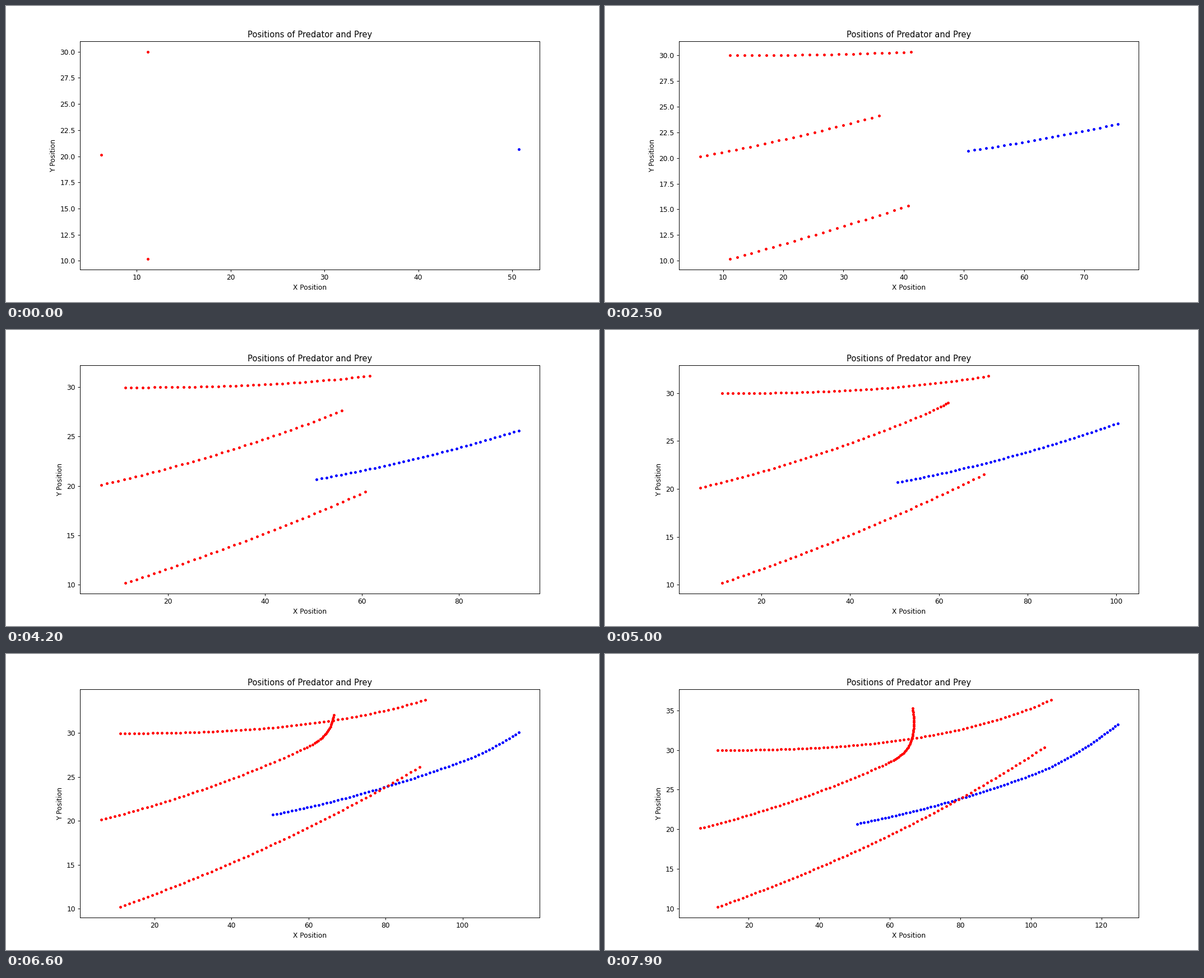
A matplotlib script for the animation above (8 s loop, 1058 px wide and 529 px high).

```python
import numpy as np
import matplotlib.pyplot as plt
from matplotlib.animation import FuncAnimation

STEPS = 80
INTERVAL = 100
t = np.arange(STEPS - 1) + 0.5  # middle of each step


def walk(x, y, vx, vy):
    """Positions after every step, starting from (x, y)."""
    return x + np.append(0, np.cumsum(vx)), y + np.append(0, np.cumsum(vy))


def steer(x, y, speed, heading):
    return walk(x, y, speed * np.cos(heading), speed * np.sin(heading))


# The prey tires late in the chase: it slows down and turns away harder.
fatigue = 1 - np.exp(-np.maximum(t - 50, 0) / 20)
prey = steer(50.72, 20.68, 1 - 0.28 * fatigue,
             0.0862 + 0.0015 * t + 0.165 * fatigue)

# The outer predators keep their speed and curve gently.
upper = steer(11.18, 29.98, 1.201, 0.0312 * np.exp(0.0253 * t) - 0.0325)
lower = steer(11.18, 10.17, 1.201, 0.1595 + 0.00094 * t + 8.6e-6 * t**2)

# The middle predator brakes, then drifts upwards.
phases = [0, 41, 49, 62, 79]
middle = walk(6.18, 20.12,
              np.interp(t, phases, [1.195, 1.175, 0.53, 0.155, -0.11]),
              np.interp(t, phases, [0.13, 0.225, 0.14, 0.215, 0.27]))

fig, ax = plt.subplots(figsize=(12, 6), dpi=1058 / 12)
ax.set_title("Positions of Predator and Prey")
ax.set_xlabel("X Position")
ax.set_ylabel("Y Position")

trails = [(ax.plot([], [], style)[0], track)
          for style, track in (("b.", prey), ("r.", upper),
                               ("r.", middle), ("r.", lower))]


def update(step):
    for line, (x, y) in trails:
        line.set_data(x[:step + 1], y[:step + 1])
    ax.relim()
    ax.autoscale_view()
    return [line for line, _ in trails]


anim = FuncAnimation(fig, update, frames=STEPS, interval=INTERVAL,
                     init_func=lambda: update(0), repeat=True,
                     repeat_delay=0, blit=False)
plt.show()
```
